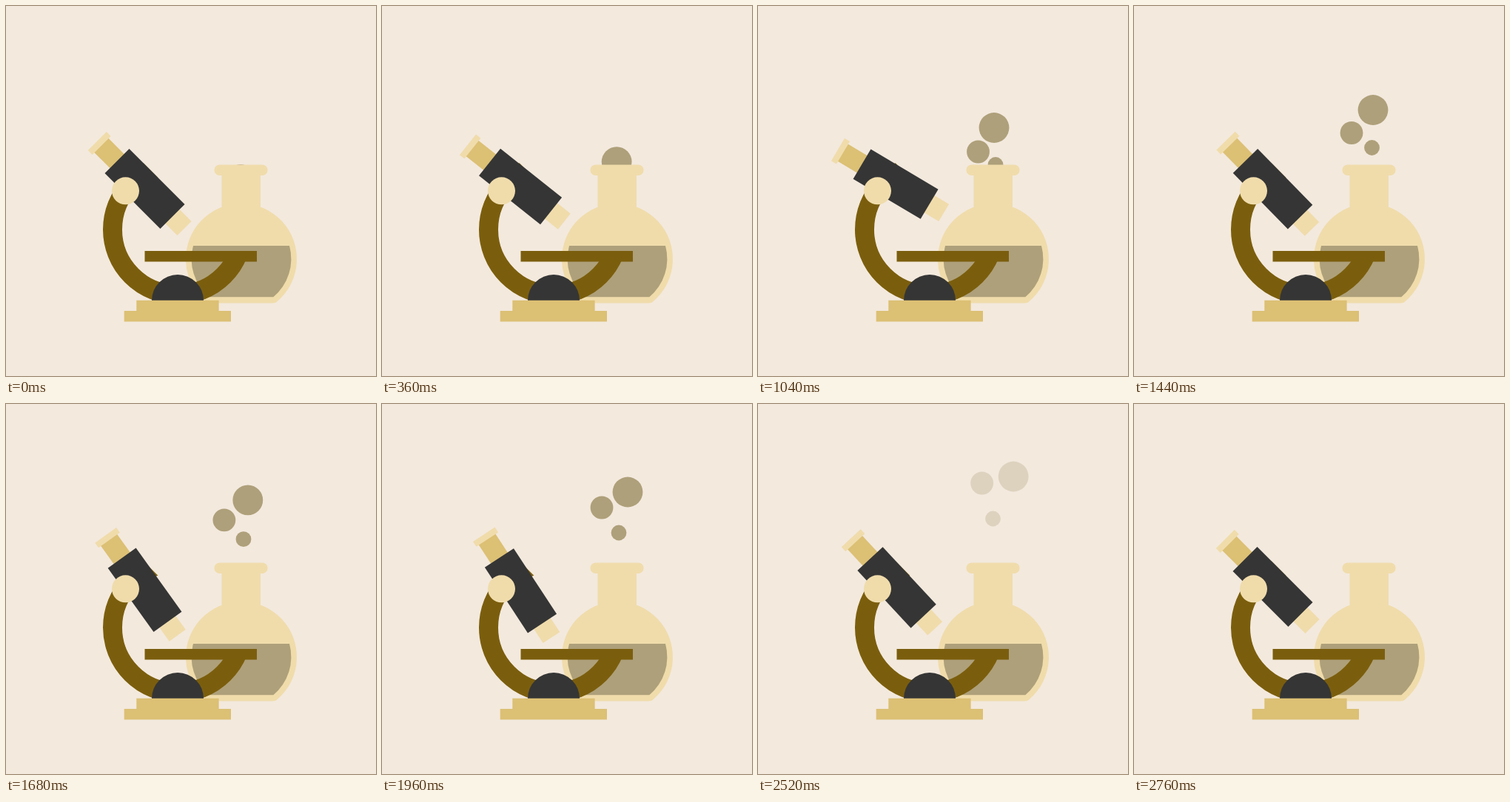
Animation, 500 px wide and 500 px high, one loop 2800 ms. Source, as an HTML page:

```html
<!DOCTYPE html>
<html lang="en">
<head>
<meta charset="utf-8">
<title>Microscope and flask</title>
<style>
  html, body { margin: 0; height: 100%; overflow: hidden; background: #f3e9dd; }
  svg { display: block; width: 100vw; height: 100vh; }
  .light { fill: #f0dcab; }
  .tan { fill: #dcc074; }
  .brown { fill: #7b5e0d; }
  .dark { fill: #353535; }
  .liquid { fill: #aea07a; }
</style>
</head>
<body>
<svg viewBox="0 0 500 500">
  <clipPath id="armClip"><path d="M100 126.5L232 258.5V331H400V410H100Z"/></clipPath>

  <g id="bubbles" class="liquid">
    <circle r="20.4"/>
    <circle r="15.4"/>
    <circle r="10.4"/>
  </g>

  <g class="light">
    <rect x="281.5" y="214.5" width="72" height="14.5" rx="7.25"/>
    <rect x="291.5" y="222" width="52.5" height="60"/>
    <path d="M269.3 399A75 75 0 1 1 366.7 399Q364.5 401.6 361 401.6H275Q271.5 401.6 269.3 399Z"/>
  </g>
  <path class="liquid" d="M253 324H383A67.2 67.2 0 0 1 361.3 393.3H274.7A67.2 67.2 0 0 1 253 324Z"/>

  <circle cx="232" cy="302" r="88" fill="none" stroke="#7b5e0d" stroke-width="26" clip-path="url(#armClip)"/>
  <rect class="brown" x="187.5" y="331" width="151.5" height="14.5"/>
  <path class="dark" d="M197 398A35 35 0 0 1 267 398Z"/>
  <path class="tan" d="M176.3 397.7H287.6V412H304V426.5H159.7V412H176.3Z"/>

  <g id="tube">
    <rect class="tan" x="-67" y="-33.7" width="32" height="27.1"/>
    <rect class="light" x="-74.3" y="-38" width="8.2" height="35.4"/>
    <rect class="light" x="69" y="-33.7" width="23.3" height="27.1"/>
    <rect class="dark" x="-36.4" y="-43.5" width="106" height="46.7"/>
  </g>
  <circle class="light" cx="161.5" cy="249.8" r="18.5"/>
</svg>
<script>
const LOOP = 2800, STEP = 40;
const tube = document.getElementById('tube');
const group = document.getElementById('bubbles');
const bubbles = [...group.children];

const times = [0, 720, 1040, 1440, 1960, 2280, 2640];
const paths = [
  { x: [317, 317.5, 319, 323, 332, 339.5, 348], y: [234.5, 186.5, 164.5, 140.5, 119, 107, 93.5] },
  { x: [314, 303, 297.5, 294, 297, 300, 304], y: [264, 217.5, 197, 171.5, 140, 121, 100] },
  { x: [319, 320, 321, 321.5, 320, 318.5, 317], y: [275, 234, 214.5, 191.5, 174, 163, 151] }
];

const clamp = v => Math.min(1, Math.max(0, v));
const ease = p => (1 - Math.cos(Math.PI * p)) / 2;

// Smooth Hermite curve through the values at the key times
function curve(values, t) {
  const last = times.length - 1;
  const slope = i => {
    const a = Math.max(0, i - 1), b = Math.min(last, i + 1);
    return (values[b] - values[a]) / (times[b] - times[a]);
  };
  let i = 0;
  while (i < last - 1 && t >= times[i + 1]) i++;
  const span = times[i + 1] - times[i];
  const p = clamp((t - times[i]) / span), q = 1 - p;
  return q * q * (1 + 2 * p) * values[i] + p * p * (3 - 2 * p) * values[i + 1]
    + p * q * span * (q * slope(i) - p * slope(i + 1));
}

function tubeAngle(t) {
  if (t < 880) return 45 - 16 * t / 880;
  if (t < 1880) return 29 + 28 * ease((t - 880) / 1000);
  return 57 - 12 * ease(clamp((t - 1880) / 880));
}

function draw(now) {
  const t = Math.floor(now % LOOP / STEP) * STEP;
  tube.setAttribute('transform', `translate(161.5 249.5) rotate(${tubeAngle(t)})`);
  bubbles.forEach((bubble, i) => {
    bubble.setAttribute('cx', curve(paths[i].x, t));
    bubble.setAttribute('cy', curve(paths[i].y, t));
  });
  group.setAttribute('opacity', 1 - clamp((t - 2240) / 400));
}

let start;
function tick(now) {
  start ??= now;
  draw(now - start);
  requestAnimationFrame(tick);
}
draw(0);
requestAnimationFrame(tick);
</script>
</body>
</html>
```
